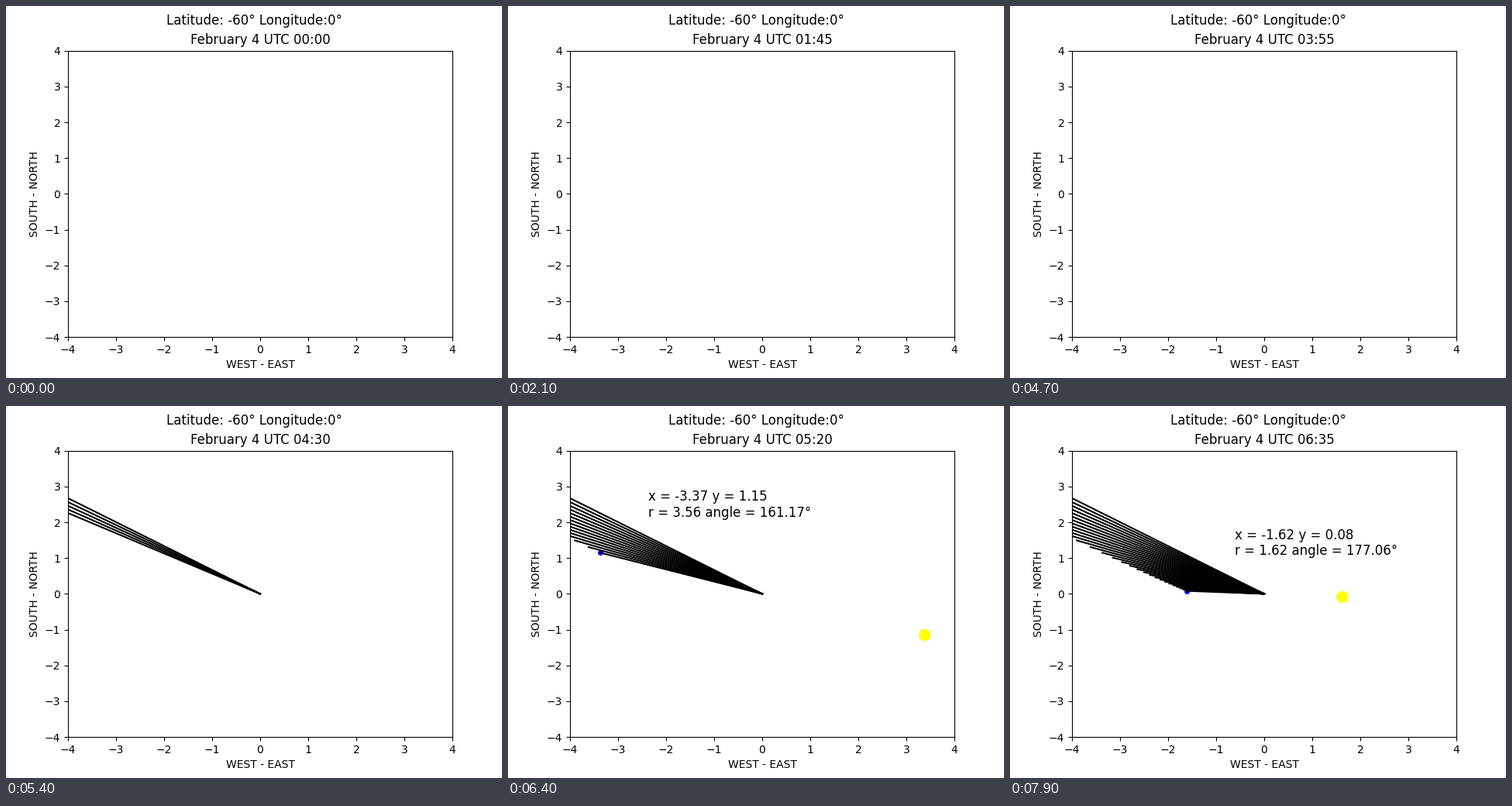
A matplotlib script that plays this animation: 640 by 480 pixels, repeating every 8000 ms.

```python
"""Shadow of a half-unit stick at 60 degrees south, one step every five minutes."""
import numpy as np
import matplotlib.pyplot as plt
from matplotlib.animation import FuncAnimation

FRAMES = 80
STEP_MIN = 5
LATITUDE = np.radians(-60)
STICK = 0.5
NOON = 12.16433  # UTC hour of solar noon


def shadow(hour):
    """Tip of the shadow (x east, y north), or None while the sun is down."""
    dec = np.radians(-16.286 + 0.0121 * (hour - 4.917))
    angle = np.radians(15 * (hour - NOON))
    sin_lat, cos_lat = np.sin(LATITUDE), np.cos(LATITUDE)
    up = sin_lat * np.sin(dec) + cos_lat * np.cos(dec) * np.cos(angle)
    if up <= 0:
        return None
    east = -np.cos(dec) * np.sin(angle)
    north = cos_lat * np.sin(dec) - sin_lat * np.cos(dec) * np.cos(angle)
    return -STICK * east / up, -STICK * north / up


def describe(x, y):
    r = np.hypot(x, y)
    angle = np.degrees(np.arctan2(y, x))
    x, y, r, angle = (round(float(v), 2) for v in (x, y, r, angle))
    return f"x = {x} y = {y}\nr = {r} angle = {angle}°"


tips = [shadow(i * STEP_MIN / 60) for i in range(FRAMES)]

fig, ax = plt.subplots(figsize=(6.4, 4.8), dpi=100)
fig.suptitle("Latitude: -60° Longitude:0°")
ax.set(xlim=(-4, 4), ylim=(-4, 4), xlabel="WEST - EAST", ylabel="SOUTH - NORTH")
title = ax.set_title("")

sun, = ax.plot([], [], "o", color="yellow", markersize=10)
tip_dot, = ax.plot([], [], "bo", markersize=4)
rays = [ax.plot([0, tip[0]], [0, tip[1]], "k-")[0] if tip else None for tip in tips]
label = ax.text(0, 0, "", fontsize=12)


def update(i):
    hours, minutes = divmod(i * STEP_MIN, 60)
    title.set_text(f"February 4 UTC {hours:02d}:{minutes:02d}")
    for k, ray in enumerate(rays):
        if ray:
            ray.set_visible(k <= i)

    tip = tips[i]
    for artist in (sun, tip_dot, label):
        artist.set_visible(tip is not None)
    if tip:
        x, y = tip
        sun.set_data([-x], [-y])
        tip_dot.set_data([x], [y])
        label.set_position((x + 1, y + 1))
        label.set_text(describe(x, y))
    return [title, sun, tip_dot, label]


anim = FuncAnimation(fig, update, frames=FRAMES, interval=100, repeat=True,
                     repeat_delay=0, blit=False)
plt.show()
```
